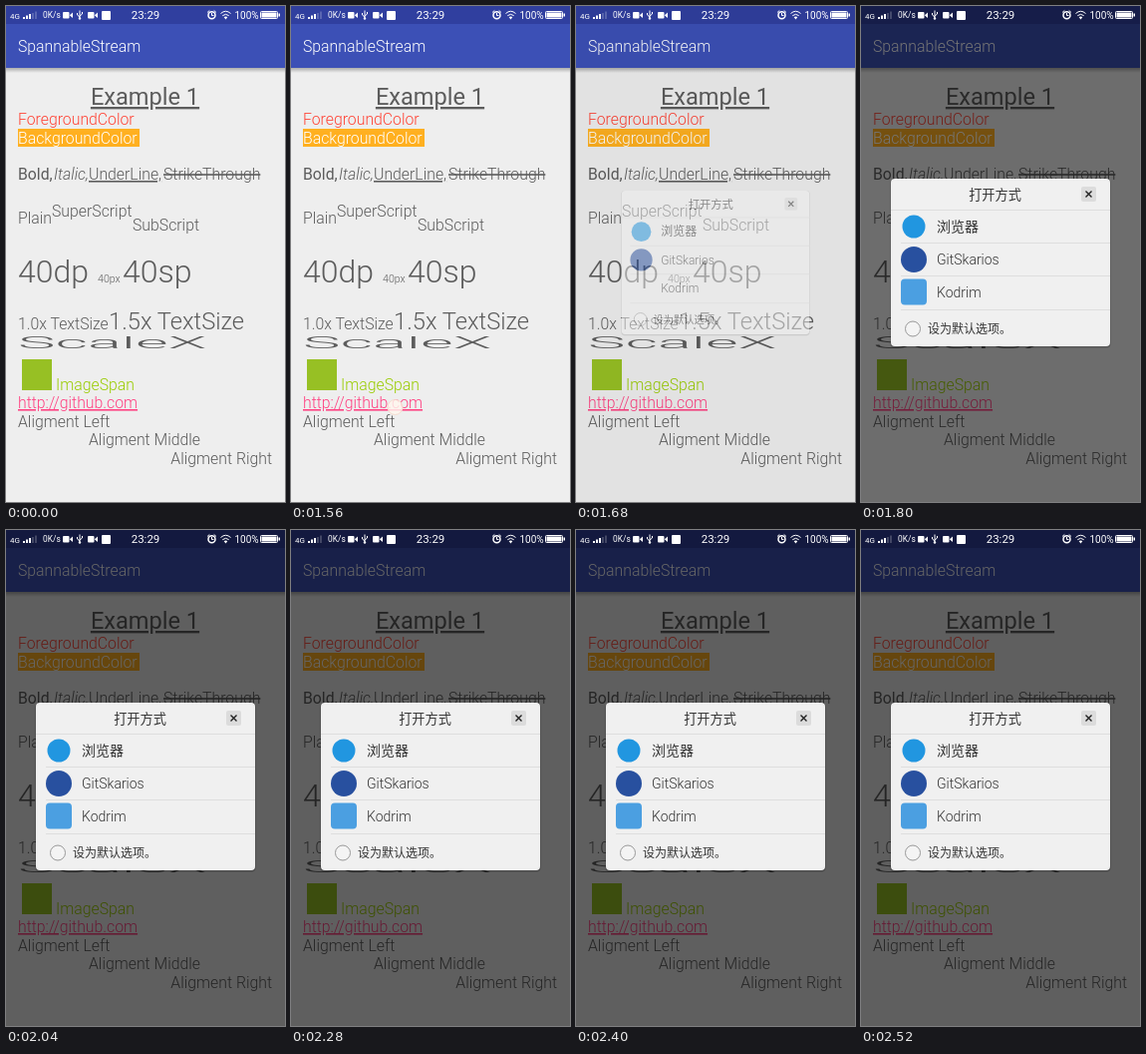
These frames come from a looping animation (280x497 px, 2640 ms). An HTML page:

```html
<!DOCTYPE html>
<html lang="en">
<head>
<meta charset="utf-8">
<title>SpannableStream</title>
<style>
html, body { margin: 0; width: 100%; height: 100%; overflow: hidden; background: #eee; }
svg { display: block; width: 280px; height: 497px; }
text { font-family: Roboto, "Noto Sans CJK SC", "Noto Sans CJK", sans-serif; font-weight: 300; white-space: pre; text-decoration-thickness: 1px; }
#page { font-size: 15.8px; fill: #5c5c5c; }
#page .bold { font-weight: 400; }
.under { text-decoration-line: underline; }
.strike { text-decoration-line: line-through; }
#dialog { font-size: 14px; fill: #333; }
#status { fill: #fff; font-size: 8.4px; }
#status text { font-weight: 400; }
.line { fill: none; stroke: #fff; stroke-width: 1; }
.rule { stroke: #dedede; }
</style>
</head>
<body>
<svg viewBox="0 0 280 497">
  <defs>
    <linearGradient id="shade" x2="0" y2="1">
      <stop stop-color="#000" stop-opacity=".28"/>
      <stop offset="1" stop-color="#000" stop-opacity="0"/>
    </linearGradient>
    <g id="camera">
      <rect width="6.5" height="6.5" rx="1"/>
      <path d="M6.8 3.2 L10 .5 V6 Z"/>
    </g>
  </defs>

  <g id="page">
    <rect width="280" height="497" fill="#eee"/>
    <rect width="280" height="62" fill="#3c50b6"/>
    <rect width="280" height="18" fill="#303f9f"/>
    <rect y="62" width="280" height="5" fill="url(#shade)"/>
    <text x="12" y="46" fill="#fff">SpannableStream</text>

    <text class="bold under" x="139.5" y="99" font-size="23.6" text-anchor="middle">Example 1</text>
    <text x="12" y="119" fill="#ff4436">ForegroundColor</text>
    <rect x="12" y="123" width="122" height="18" fill="#ffb020"/>
    <text x="12" y="137.5" fill="#fff">BackgroundColor</text>

    <text class="bold" x="12" y="174">Bold,</text>
    <text x="48" y="174" font-style="italic">Italic,</text>
    <text class="under" x="83" y="174">UnderLine,</text>
    <text class="strike" x="158" y="174">StrikeThrough</text>

    <text x="12" y="218">Plain</text>
    <text x="46" y="211">SuperScript</text>
    <text x="127" y="225">SubScript</text>

    <text x="12" y="276.5" font-size="32">40dp</text>
    <text x="92" y="276.5" font-size="10.6">40px</text>
    <text x="117" y="276.5" font-size="32">40sp</text>

    <text x="12" y="323.5">1.0x TextSize</text>
    <text x="103" y="323.5" font-size="23.7">1.5x TextSize</text>
    <text transform="translate(12 343) scale(4 1)">ScaleX</text>

    <rect x="16" y="354" width="30" height="31" fill="#97c024"/>
    <text x="50" y="384.5" fill="#99cc00">ImageSpan</text>
    <text class="under" x="12" y="403" fill="#ff4081">http://github.com</text>
    <text x="12" y="421.5">Aligment Left</text>
    <text x="139" y="440" text-anchor="middle">Aligment Middle</text>
    <text x="267" y="458.5" text-anchor="end">Aligment Right</text>
  </g>

  <circle id="touch" cx="104.5" cy="402" r="7.5" fill="#fff6ee" fill-opacity=".8" stroke="#f6dccf"/>
  <rect id="dim" width="280" height="497"/>

  <g id="status">
    <text x="4" y="12.5" font-size="8">4G</text>
    <path d="M17 13v-2h2v2z M20 13v-3.5h2v3.5z M23 13v-5h2v5z"/>
    <path class="line" stroke-opacity=".4" d="M27 13v-6 M30 13v-7.5"/>
    <text x="37" y="12.3">0K/s</text>
    <use href="#camera" x="57" y="6"/>
    <path class="line" d="M74 4.5v8 M71.5 7v2l2.5 2 M76.5 6v2l-2.5 2"/>
    <circle cx="74" cy="12.5" r="1.2"/>
    <use href="#camera" x="82" y="6"/>
    <rect x="96" y="5" width="9" height="9" rx="1"/>
    <text x="140" y="13.2" font-size="11.5" text-anchor="middle">23:29</text>
    <circle class="line" style="stroke-width:1.5" cx="206.5" cy="9.3" r="3.5"/>
    <path class="line" d="M206.5 7v2.5h2 M202 6.5l2.3-2 M211 6.5l-2.3-2"/>
    <path class="line" d="M215.5 7.5q5-4.5 10 0 M217.3 9.7q3.2-2.8 6.4 0"/>
    <path d="M218.7 11.2q1.8-1.4 3.6 0l-1.8 2.3z"/>
    <text x="229.5" y="12.7" font-size="10">100%</text>
    <rect class="line" x="255.5" y="5.5" width="17" height="7" rx="1"/>
    <rect x="256.5" y="6.5" width="15" height="5"/>
    <rect x="273.5" y="7.5" width="1.5" height="3"/>
  </g>

  <g id="dialog">
    <rect x="29.5" y="173" width="221" height="169.5" rx="4" fill="#000" fill-opacity=".2"/>
    <rect x="30" y="173" width="220" height="168" rx="4" fill="#f0f0f0"/>
    <path class="rule" d="M30 204.5H250 M40 237.5H250 M40 270.5H250 M40 304.5H250"/>
    <text x="134.5" y="193.5" font-size="13.2" text-anchor="middle" style="font-weight:400">打开方式</text>
    <rect x="221" y="181" width="15" height="15" rx="2" fill="#dcdcdc"/>
    <path d="M225.5 185.5l6 6m0-6l-6 6" stroke="#222" stroke-width="1.4"/>
    <circle cx="53" cy="221" r="11.5" fill="#2196e0"/>
    <text x="76" y="226">浏览器</text>
    <circle cx="53" cy="254" r="13" fill="#28509f"/>
    <text x="76" y="259">GitSkarios</text>
    <rect id="appIcon" x="40" y="273.5" width="26" height="26" rx="4" fill="#4b9fe1"/>
    <text x="76" y="292">Kodrim</text>
    <circle cx="52" cy="323.5" r="7.5" fill="#f4f4f4" stroke="#999"/>
    <text x="67" y="328" font-size="12">设为默认选项。</text>
  </g>
</svg>
<script>
const LOOP = 2640, STEP = 120, TAP = 13;
const el = id => document.getElementById(id);
const show = (id, alpha) => el(id).setAttribute("opacity", alpha);
const dims = [0, 0.05, 0.54, 0.6];

function draw(now) {
  // Steps since the tap; negative while the page is idle.
  const step = Math.floor(now % LOOP / STEP) - TAP;
  const opening = step === 1;
  const scale = opening ? 0.856 : 1;
  show("touch", step === 0 ? 1 : 0);
  show("dim", dims[Math.max(0, Math.min(step, 3))]);
  show("dialog", step < 1 ? 0 : opening ? 0.5 : 1);
  show("appIcon", opening ? 0 : 1);
  el("dialog").setAttribute("transform",
    `translate(140 257) scale(${scale}) translate(-140 -257)`);
}

const start = performance.now();
function tick() {
  draw(performance.now() - start);
  requestAnimationFrame(tick);
}
tick();
</script>
</body>
</html>
```
